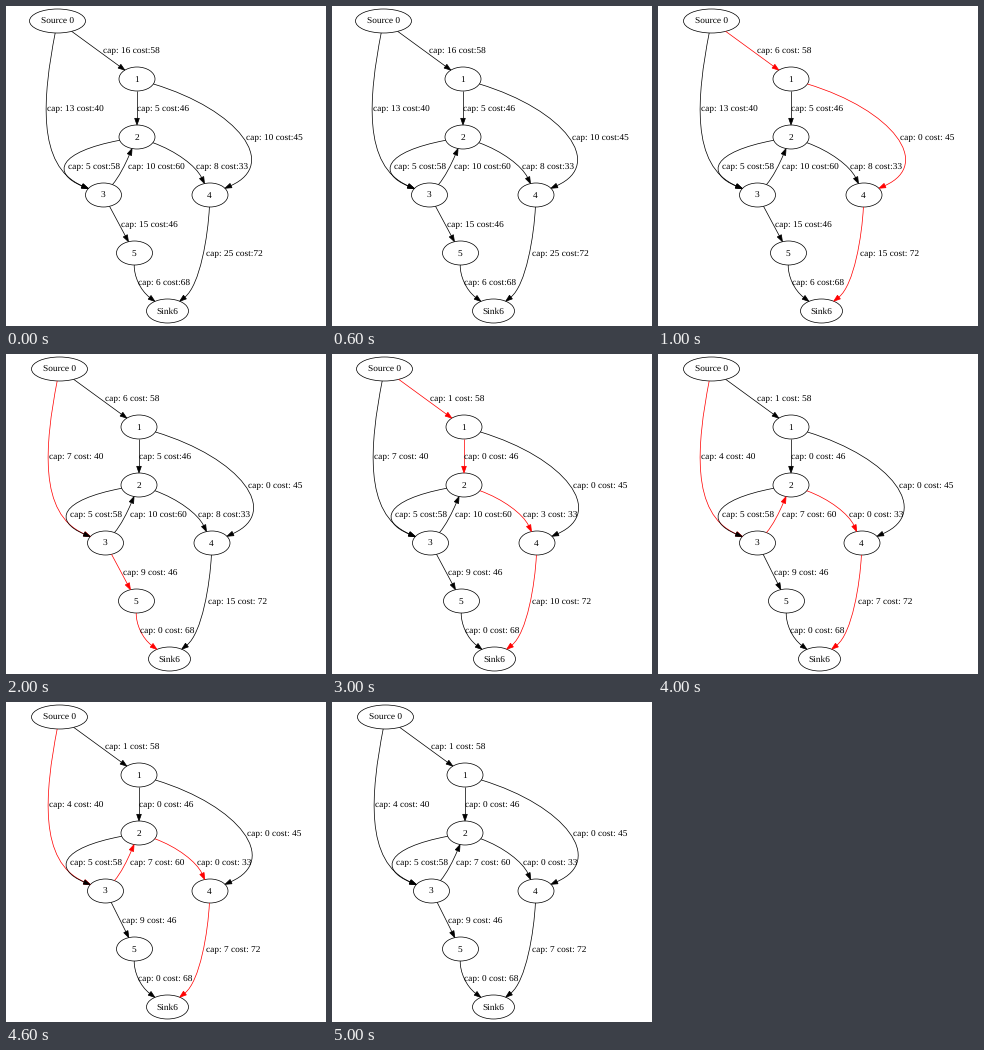
Recreate the animation shown at these times as a matplotlib script. Size 320x320 px, loop 6 s.

```python
import matplotlib.pyplot as plt
from matplotlib.animation import FuncAnimation
from matplotlib.patches import Ellipse, PathPatch, Polygon
from matplotlib.path import Path
import numpy as np

SIZE, DPI = 320, 80
PX = 72 / DPI
ROW, TOP, RY = 58, 15, 12
HEAD = 6.67
LINE = 0.72 * PX
FONT = dict(family="Liberation Serif", fontsize=9.33 * PX, va="baseline")

plt.rcParams["text.hinting"] = "none"

# name: (label, x, row, horizontal radius)
NODES = {
    "S": ("Source 0", 51.5, 0, 28),
    "1": ("1", 131, 1, 18),
    "2": ("2", 131, 2, 18),
    "3": ("3", 97.5, 3, 18),
    "4": ("4", 204, 3, 18),
    "5": ("5", 128.5, 4, 18),
    "K": ("Sink6", 161.5, 5, 21),
}

# tail + head: (capacity, cost, label x, control points of a bent edge)
EDGES = {
    "S1": (16, 58, 97),
    "S3": (13, 40, 41, (37, 90), (30, 160)),
    "12": (5, 46, 131),
    "14": (10, 45, 239.7, (233, 104), (273, 158)),
    "23": (5, 58, 62, (52, 146), (45, 167)),
    "24": (8, 33, 190.3, (170, 145), (190, 160)),
    "32": (10, 60, 122, (113, 171), (119, 159)),
    "35": (15, 46, 115.3),
    "4K": (25, 72, 199.5, (202, 230), (194, 279)),
    "5K": (6, 68, 132.3, (128, 270), (134, 284)),
}

# per step: edges of the augmenting path and the flow pushed
FLOWS = {
    1: (("S1", "14", "4K"), 10),
    2: (("S3", "35", "5K"), 6),
    3: (("S1", "12", "24", "4K"), 5),
    4: (("S3", "32", "24", "4K"), 3),
}

SHIFT = (0, 2, 2, 1, 2, 2)

fig = plt.figure(figsize=(SIZE / DPI, SIZE / DPI), dpi=DPI, facecolor="white")
ax = fig.add_axes([0, 0, 1, 1])


def drift(name, step):
    """The layout slides sideways; its lower right closes up as labels shrink."""
    return SHIFT[step] - 2 * (step >= 4 and name in "45K")


def center(name, step):
    _, x, row, _ = NODES[name]
    return np.array([x + drift(name, step), TOP + ROW * row])


def border(name, step, toward):
    """Point where the ray from a node's center leaves its ellipse."""
    mid = center(name, step)
    ray = toward - mid
    return mid + ray / np.hypot(ray[0] / NODES[name][3], ray[1] / RY)


def draw_node(name, step):
    label, _, _, rx = NODES[name]
    x, y = center(name, step)
    ax.add_patch(Ellipse((x, y), 2 * rx, 2 * RY, fill=False, ec="black",
                         lw=LINE))
    ax.text(x - 0.4, y + 3, label, ha="center", **FONT)


def draw_arrow(tail, head, bend, step, color):
    shift_a, shift_b = drift(tail, step), drift(head, step)
    if bend:
        c1 = bend[0] + np.array([(2 * shift_a + shift_b) / 3, 0])
        c2 = bend[1] + np.array([(shift_a + 2 * shift_b) / 3, 0])
    else:
        c1, c2 = center(head, step), center(tail, step)

    start, tip = border(tail, step, c1), border(head, step, c2)
    along = (tip - c2) / np.hypot(*(tip - c2))
    base = tip - HEAD * along
    side = 0.35 * HEAD * np.array([-along[1], along[0]])

    if bend:
        path = Path([start, c1, c2, base], [Path.MOVETO] + [Path.CURVE4] * 3)
    else:
        path = Path([start, base])
    ax.add_patch(PathPatch(path, fill=False, ec=color, lw=LINE))
    ax.add_patch(Polygon([base + side, tip, base - side], fc=color, ec=color,
                         lw=LINE, joinstyle="miter"))


def draw_edge(name, step):
    cap, cost, x, *bend = EDGES[name]
    used = [flow for k, (path, flow) in FLOWS.items()
            if k <= step and name in path]
    active = step in FLOWS and name in FLOWS[step][0]
    tail, head = name
    draw_arrow(tail, head, bend, step, "red" if active else "black")

    x += (drift(tail, step) + drift(head, step)) / 2
    y = (center(tail, step)[1] + center(head, step)[1]) / 2
    gap = " " if used else ""
    ax.text(x, y + 3, f"cap: {cap - sum(used)} cost:{gap}{cost}", ha="left",
            **FONT)


def draw(step):
    ax.clear()
    ax.set(xlim=(0, SIZE), ylim=(SIZE, 0))
    ax.axis("off")
    for name in NODES:
        draw_node(name, step)
    for name in EDGES:
        draw_edge(name, step)
    return ax.patches + ax.texts


anim = FuncAnimation(fig, draw, frames=6, interval=1000, repeat=True,
                     repeat_delay=0)
plt.show()
```
